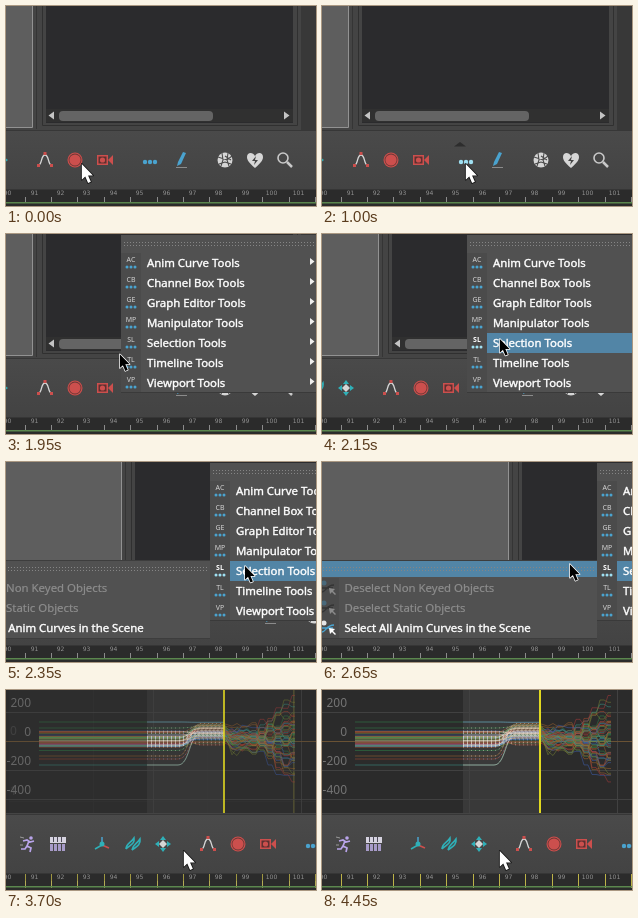
Animation of 310x200 px, one loop 4.7 s. Source, as an HTML page with a canvas:

```html
<!DOCTYPE html>
<html lang="en">
<head>
<meta charset="utf-8">
<style>
html, body { margin: 0; width: 100%; height: 100%; overflow: hidden; background: #444; }
canvas { display: block; width: 310px; height: 200px; }
</style>
</head>
<body>
<canvas id="stage" width="310" height="200"></canvas>
<script>
const ctx = document.getElementById('stage').getContext('2d');
const LOOP = 4700, STEP = 50, PAN = 163;
const BLUE = '#5285a6', CYAN = '#4aa3cf', RED = '#cc4f4d', PALE = '#d6d6d6', TEAL = '#2fb0b8';
const UI_FONT = '500 11.4px "Noto Sans", sans-serif';
const AXIS_FONT = '12px "Noto Sans", sans-serif';

// Pointer path: time, x, y in the panned space
const POINTER = [
  [400, 75, 157], [1000, 143, 157], [1300, 143, 157], [1650, 88, 132], [1750, 88, 132],
  [2200, 150, 104], [2350, 150, 104], [2600, 90, 100.5], [3100, 14, 160],
];

const ramp = (t, a, b) => Math.min(1, Math.max(0, (t - a) / (b - a)));
const ease = (t, a, b) => { const p = ramp(t, a, b); return p * p * (3 - 2 * p); };
const mix = (a, b, p) => a + (b - a) * p;

function rect(x, y, w, h, color) { ctx.fillStyle = color; ctx.fillRect(x, y, w, h); }
function fill(d, color) { ctx.fillStyle = color; ctx.fill(new Path2D(d)); }
function stroke(d, color, width = 1) {
  ctx.strokeStyle = color;
  ctx.lineWidth = width;
  ctx.stroke(new Path2D(d));
}
function disc(x, y, r, color) {
  ctx.fillStyle = color;
  ctx.beginPath();
  ctx.arc(x, y, r, 0, 7);
  ctx.fill();
}
function text(s, x, y, color, font, align = 'left') {
  ctx.font = font;
  ctx.textAlign = align;
  ctx.fillStyle = color;
  ctx.fillText(s, x, y);
}
function menuText(s, x, y, enabled) {
  const color = enabled ? '#fff' : '#8d8d8d';
  text(s, x, y, color, UI_FONT);
  ctx.strokeStyle = color;
  ctx.lineWidth = enabled ? .4 : .2;
  ctx.strokeText(s, x, y);
}
function at(x, y, draw) { ctx.save(); ctx.translate(x, y); draw(); ctx.restore(); }
function faded(alpha, draw) {
  if (alpha <= 0) return;
  ctx.save();
  ctx.globalAlpha = alpha;
  draw();
  ctx.restore();
}

function pointerAt(t) {
  let i = 0;
  while (i < POINTER.length - 2 && t >= POINTER[i + 1][0]) i++;
  const [t0, x0, y0] = POINTER[i], [t1, x1, y1] = POINTER[i + 1];
  const p = ease(t, t0, t1);
  return { x: mix(x0, x1, p), y: mix(y0, y1, p) };
}

function drawPanels() {
  rect(-PAN, 0, 480, 125, '#444');
  rect(-PAN, 0, PAN + 26, 121, '#5e5e5e');
  stroke('M-163 121.5H26.5V0', '#929292');
  stroke('M30.5 0V123', '#353535');
  stroke('M36.5 0V119.5H291.5V0', '#303030');
  rect(40, 0, 247, 117, '#2b2b2d');
  rect(40, 103, 247, 13, '#303030');
  ctx.fillStyle = '#646464';
  ctx.beginPath();
  ctx.roundRect(53, 105, 154, 10, 4);
  ctx.fill();
  fill('M42.5 109.5L48 105.5V113.5ZM283.5 109.5L278 105.5V113.5Z', '#c4c4c4');
  rect(295, 0, 20, 124, '#383838');
}

const ICONS = {
  '-141'() {
    disc(3, -6, 1.8, '#b9a4ea');
    stroke('M-5 -3L-1 -4L2 -2L6 -3M1 -3L-1 2L3 4L2 8M-1 2L-3 5L-7 5', '#b9a4ea', 1.7);
    stroke('M-8 -7L-4 -6M-8 1H-5', '#9a9a9a');
  },
  '-111'() {
    rect(-8, -7, 16, 6, '#d6d3e0');
    for (let x = -8; x < 8; x += 4) rect(x, 0, 3, 7, '#a79bc9');
    stroke('M-4.5 -7V-2M-.5 -7V-2M3.5 -7V-2', '#4d4a58');
  },
  '-67'() {
    stroke('M0 1V-7', CYAN, 1.5);
    stroke('M0 1L-7 5', TEAL, 1.5);
    stroke('M0 1L7 4', RED, 1.5);
    disc(0, 0, 2.5, TEAL);
  },
  '-36'() {
    stroke('M-7 5C-7 -1 -2 -1 1 -6C2 0 -3 1 -7 5M-1 6C0 0 4 0 7 -5C8 1 3 3 -1 6', TEAL, 1.6);
  },
  '-6'() {
    fill('M0 -8L3 -4H-3ZM0 8L3 4H-3ZM-8 0L-4 -3V3ZM8 0L4 -3V3Z', TEAL);
    fill('M0 -4L4 0L0 4L-4 0Z', PALE);
  },
  39() {
    stroke('M-6 5C-3 4 -4 -5 0 -5S3 4 6 5', PALE, 1.3);
    for (const [x, y] of [[-8, 4], [5, 4], [-1.5, -8]]) rect(x, y, 3, 3, RED);
  },
  69() { disc(0, 0, 7.5, RED); disc(0, 0, 6.4, '#6b3735'); disc(0, 0, 5.6, RED); },
  99() {
    rect(-8, -5, 11, 10, RED);
    rect(-6.5, -3.5, 8, 7, '#5d3030');
    fill('M3 0L8 -5V5Z', RED);
    disc(-2.5, 0, 2.6, RED);
  },
  175() {
    fill('M2 -8L5 -7L0 4L-4 6L-3 2Z', CYAN);
    stroke('M-5 7.5H6', '#8b8b8b');
  },
  219() {
    disc(0, 0, 7.5, PALE);
    stroke('M-7 -3L2 0L7 -4M-6 4L0 2L6 4M-3 -7L-2 0L-4 6M3 -7L2 0L4 6M0 -4L6 0', '#4b4b4b', 1.1);
  },
  249() {
    fill('M0 8C-6 3 -8 0 -8 -3C-8 -8 -2 -8 0 -4C2 -8 8 -8 8 -3C8 0 6 3 0 8Z', PALE);
    fill('M1 -4L-3 1H0L-1 5L3 0H0Z', '#444');
  },
  279() {
    stroke('M3 -2A5 5 0 1 1 -7 -2A5 5 0 1 1 3 -2', '#c9c9c9', 1.6);
    stroke('M2 2L7 7', '#c9c9c9', 2.5);
  },
};

function drawToolbar(hover) {
  const shade = ctx.createLinearGradient(0, 124, 0, 183);
  shade.addColorStop(0, '#4a4a4a');
  shade.addColorStop(1, '#434343');
  rect(-PAN, 124, 480, 60, shade);
  rect(-PAN, 124, 480, 1, '#373737');
  for (const x in ICONS) at(+x, 154, ICONS[x]);
  for (const x of [139, 144, 149]) disc(x, 156, 2.2, hover ? '#9fe0f2' : CYAN);
  if (hover) fill('M132 140.5L138 136L144 140.5Z', '#2d2d2d');
}

function tearOff(x0, x1, y) {
  for (let x = x0; x < x1; x += 3)
    for (const dy of [0, 3]) rect(x, y + dy, 1, 1, '#858585');
}

function drawMenu(active) {
  rect(115, 1, 210, 158, '#515151');
  rect(115, 19, 20, 140, '#4b4b4b');
  rect(115, 158, 210, 1, '#3a3a3a');
  tearOff(118, 322, 8);
  const names = ['Anim Curve', 'Channel Box', 'Graph Editor', 'Manipulator', 'Selection', 'Timeline', 'Viewport'];
  const codes = ['AC', 'CB', 'GE', 'MP', 'SL', 'TL', 'VP'];
  names.forEach((name, i) => {
    const y = 29 + i * 20, on = i === active;
    if (on) rect(135, y - 10, 190, 20, BLUE);
    text(codes[i], 125, y - 1, on ? '#fff' : '#d2d2d2', (on ? 'bold ' : '') + '7px "Noto Sans", sans-serif', 'center');
    for (const x of [121, 125, 129]) disc(x, y + 4, 1.5, on ? '#9fe0f2' : CYAN);
    menuText(name + ' Tools', 141, y + 4, true);
    fill(`M304 ${y - 5}L308.5 ${y - 1.5}L304 ${y + 2}Z`, '#eee');
  });
}

function drawSubmenu(pointer) {
  rect(-PAN, 98, 278, 79, '#515151');
  rect(-PAN, 116, 20, 60, '#4b4b4b');
  if (pointer.x < 115 && pointer.y < 116) rect(-PAN, 99, 278, 16, BLUE);
  if (pointer.y >= 156) rect(20 - PAN, 156, 258, 20, BLUE);
  rect(-PAN, 98, 278, 1, '#3d3d3d');
  rect(-PAN, 176, 278, 1, '#3d3d3d');
  tearOff(-PAN + 1, 112, 105);
  ['Deselect Non Keyed Objects', 'Deselect Static Objects', 'Select All Anim Curves in the Scene'].forEach((label, i) => {
    const y = 126 + i * 20, on = i === 2;
    at(-153, y, () => {
      stroke('M-7 4C-3 4 -3 -3 5 -3M-7 0H4', on ? CYAN : '#343434', 1.3);
      fill('M0 0L6 1L4 3L7 6L6 7L3 4L1 6Z', on ? '#fff' : '#8b8b8b');
      disc(-5, -5, 2.5, on ? '#e6e6e6' : '#49697a');
    });
    menuText(label, -137.5, y + 4, on);
  });
}

function drawCloseGraph() {
  rect(0, 0, 310, 123, '#383838');
  rect(289, 0, 21, 123, '#2c2c2c');
  rect(0, 0, 3, 123, '#2f2f2f');
  stroke('M87.5 0V123M201.5 0V123M3 111.5H310', '#484848');
  stroke('M3 51.5H310', '#5a5a5a');
  text('0', 4, 45, '#999', AXIS_FONT);
  text('1', 4, 105, '#999', AXIS_FONT);
  rect(287, 0, 1.6, 123, '#d8d04a');
}

function seeded(seed) {
  return () => (seed = (seed * 16807) % 2147483647) / 2147483647;
}
const random = seeded(77);
const bell = () => random() + random() + random() - 1.5;
const HUES = ['#b23b3b', '#2f8a4a', '#3f62b8', '#a8672e', '#b24a30', '#3a9d8f', '#7d8a35'];
const OUTLIERS = [32, 38, 41, 66, 69, 75];
const CURVES = Array.from({ length: 56 }, (_, i) => {
  const start = OUTLIERS[i] ?? 51 + bell() * 10;
  const mid = 43 + bell() * 9, late = 48 + bell() * 11;
  const end = 52 + bell() * 44;
  let d = `M33 ${start}H172C184 ${start} 183 ${mid} 195 ${mid}H218`;
  // Uneven steps that drift apart towards the end
  for (let x = 226; x <= 246; x += 5) d += `L${x} ${late + bell() * 4}`;
  for (let x = 254; x < 289; x += 8)
    d += `H${x - 4}L${x} ${mix(late, end, ramp(x, 246, 280)) + bell() * 9}`;
  return { d: d + 'H289', hue: i ? HUES[i % HUES.length] : '#2f8a4a' };
});

function drawWideGraph() {
  rect(0, 0, 310, 123, '#2b2b2b');
  rect(141, 0, 77, 123, '#393939');
  stroke('M0 22.5H310M0 80.5H310M0 109.5H310M147.5 0V123M295.5 0V123', '#414141');
  stroke('M0 51.5H310', '#6a5234');
  [200, 0, -200, -400].forEach((n, i) => text(n, 25, 17 + i * 29, '#747474', AXIS_FONT, 'right'));
  ctx.save();
  ctx.globalAlpha *= .7;
  for (const c of CURVES) stroke(c.d, c.hue, .7);
  ctx.beginPath();
  ctx.rect(141, 0, 77, 123);
  ctx.clip();
  CURVES.forEach((c, i) => {
    ctx.setLineDash(i % 5 ? [1, 3] : []);
    stroke(c.d, i % 4 ? '#e8dcc8' : '#86a4ee', .7);
  });
  ctx.restore();
  rect(217, 0, 2, 123, '#e0d820');
}

function drawRuler(keyed) {
  rect(0, 183, 310, 17, '#2b2b2b');
  rect(0, 183, 310, 1, '#363636');
  for (let i = -1; i < 12; i++) {
    const x = Math.round(18.5 + i * 26.4);
    rect(x, 191, 1, 5, '#8c8c8c');
    faded(keyed, () => rect(x, 184, 1, 14, '#bdb348'));
    text(91 + i, x + 9.5, 189, '#929292', '6px "DejaVu Sans", sans-serif', 'center');
  }
  rect(0, 196, 310, 1.5, '#5b874e');
}

function drawPointer(x, y, dark) {
  at(x + (dark ? 0 : .8), y + (dark ? 0 : 1), () => {
    const scale = dark ? .76 : .87;
    ctx.scale(scale, scale);
    const arrow = 'M0 0V18L4 14.3L7.2 21.8L10.4 20.4L7.2 13.2H12.8Z';
    ctx.lineJoin = 'round';
    stroke(arrow, dark ? '#fff' : '#111', 2);
    fill(arrow, dark ? '#000' : '#fff');
  });
}

function draw(t) {
  const pan = Math.round(PAN * ease(t, 1940, 2710));
  const p = pointerAt(t);
  const menuAlpha = t < 1250 ? 0 : 1 - ramp(t, 3500, 3700);
  const subOpen = t >= 2200;
  const row = subOpen ? 4 : p.x > 115 && t > 1750 ? Math.floor((p.y - 19) / 20) : -1;
  const wide = ramp(t, 3500, 3750);

  ctx.clearRect(0, 0, 310, 200);
  at(pan, 0, () => {
    drawPanels();
    drawToolbar(p.x > 129 && t < 1750);
    faded(menuAlpha, () => {
      drawMenu(row);
      if (subOpen) drawSubmenu(p);
    });
  });
  faded(ramp(t, 2650, 2850), drawCloseGraph);
  faded(wide, drawWideGraph);
  drawRuler(wide);
  drawPointer(p.x + pan, p.y, menuAlpha > 0);
}

function tick() {
  draw(Math.floor((performance.now() % LOOP) / STEP) * STEP);
  requestAnimationFrame(tick);
}
tick();
</script>
</body>
</html>
```
